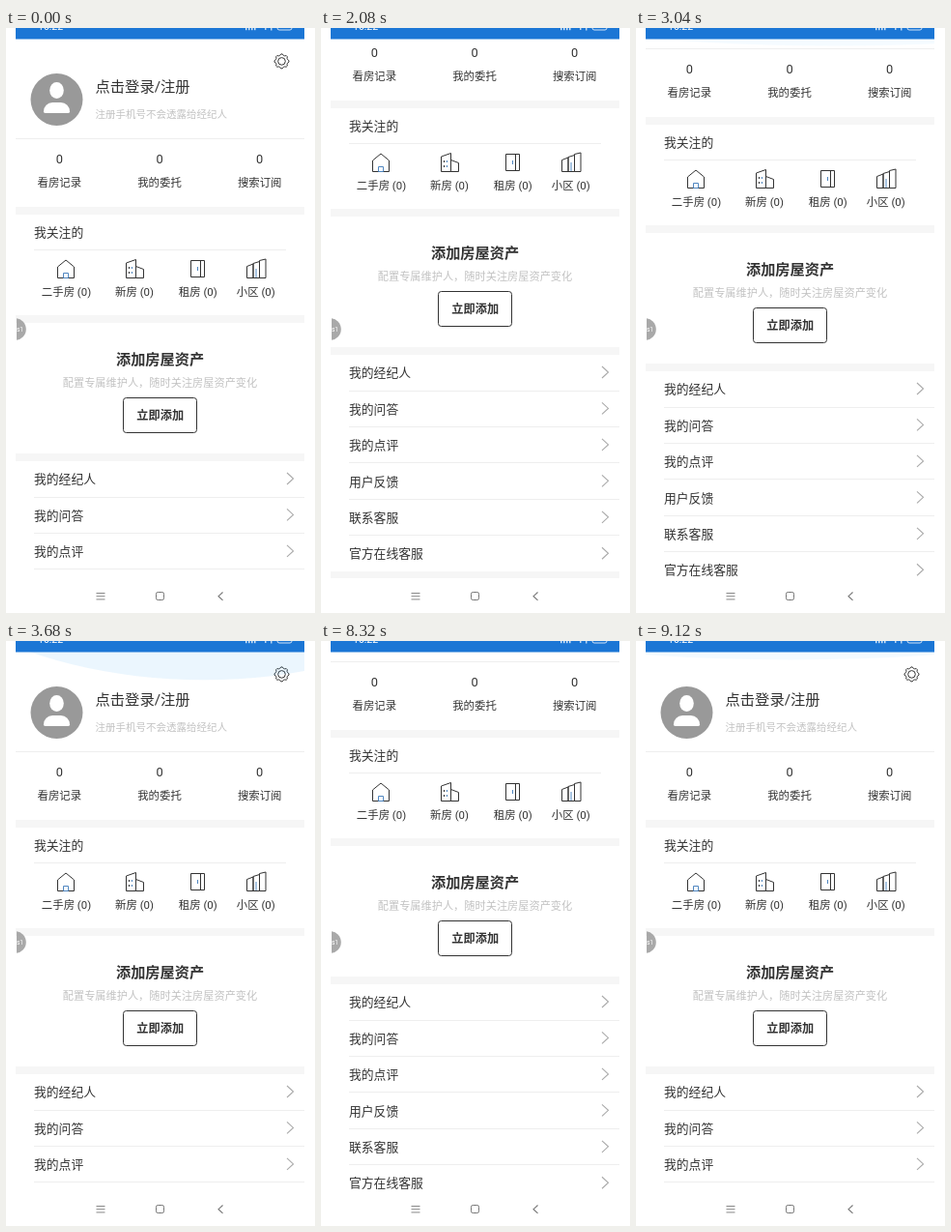
An HTML page with a canvas that plays this animation: 320x605 px, repeating every 9.28 s.

```html
<!DOCTYPE html>
<html lang="zh-CN">
<head>
<meta charset="utf-8">
<style>
html, body { margin: 0; width: 100%; height: 100%; overflow: hidden; background: #fff; }
canvas { display: block; width: 320px; height: 605px; }
</style>
</head>
<body>
<canvas id="stage"></canvas>
<script>
const W = 320, H = 605, LOOP = 9280, TICK = 160;
const LEFT = 10, RIGHT = 309, WIDE = RIGHT - LEFT, BAR = 11.5, NAV = 569;
const FONT = 'Roboto, "Noto Sans CJK SC", "Noto Sans CJK", sans-serif';
const INK = '#333', PALE = '#c2c2c2', LINE = '#eee', BAND = '#f6f6f6', BLUE = '#4f86c0';

const canvas = document.getElementById('stage');
const ctx = canvas.getContext('2d');
const dpr = window.devicePixelRatio || 1;
canvas.width = W * dpr;
canvas.height = H * dpr;

// Each trip flings to the end of the page and returns to the top,
// where the leftover pull shows as a fading glow.
const MAX_SCROLL = 110, FLING = 320, RETURN = 480, FADE = 800;
const trips = [
  { start: 320, end: 1440, pull: .4, x: 205 },
  { start: 1600, end: 2720, pull: .4, x: 205 },
  { start: 2880, end: 3680, pull: .6, x: 205 },
  { start: 8160, end: 8960, pull: .26, x: 160 }
];

const clamp = u => Math.min(1, Math.max(0, u));
const easeOut = u => 1 - (1 - u) ** 2.7;
const smooth = u => u * u * (3 - 2 * u);

function scrollAt(t) {
  const shares = trips.map(({ start, end }) =>
    easeOut(clamp((t - start) / FLING)) - smooth(clamp((t - end) / RETURN + 1)));
  return MAX_SCROLL * shares.reduce((sum, share) => sum + share, 0);
}

function box(x, y, w, h, color) {
  ctx.fillStyle = color;
  ctx.fillRect(x, y, w, h);
}

// Text is centred vertically on cy.
function text(str, x, cy, size, color = INK, align = 'left', weight = 400) {
  ctx.font = `${weight} ${size}px ${FONT}`;
  ctx.textAlign = align;
  ctx.fillStyle = color;
  ctx.fillText(str, x, cy + size * .37);
}

function path(points, color = INK, width = 1, close = false) {
  ctx.beginPath();
  for (let i = 0; i < points.length; i += 2) ctx.lineTo(points[i], points[i + 1]);
  if (close) ctx.closePath();
  ctx.strokeStyle = color;
  ctx.lineWidth = width;
  ctx.stroke();
}

function disc(x, y, r, color) {
  ctx.beginPath();
  ctx.arc(x, y, r, 0, 7);
  ctx.fillStyle = color;
  ctx.fill();
}

function outline(x, y, w, h, r, color = INK) {
  ctx.beginPath();
  ctx.roundRect(x, y, w, h, r);
  ctx.strokeStyle = color;
  ctx.lineWidth = 1;
  ctx.stroke();
}

function chevron(x, y, dx, dy, color) {
  path([x, y - dy, x + dx, y, x, y + dy], color, 1.1);
}

function gear(x, y) {
  const teeth = [];
  for (let i = 0; i < 32; i++) {
    const a = (i - .5) * Math.PI / 16;
    const r = i % 4 < 2 ? 7.5 : 6.3;
    teeth.push(x + r * Math.cos(a), y + r * Math.sin(a));
  }
  path(teeth, INK, 1, true);
  ctx.beginPath();
  ctx.arc(x, y, 3.8, 0, 7);
  ctx.stroke();
}

function avatar(x, y) {
  disc(x, y, 27, '#999');
  ctx.fillStyle = '#fff';
  ctx.beginPath();
  ctx.ellipse(x, y - 9.5, 7.3, 8.5, 0, 0, 7);
  ctx.fill();
  ctx.beginPath();
  ctx.roundRect(x - 13.5, y + 3, 27, 11, [10, 10, 2, 2]);
  ctx.fill();
}

// A building with a sloping roof, standing on the icon base line.
function tower(x, w, left, right) {
  const base = 258.5;
  path([x, base, x, left, x + w, right, x + w, base], INK, 1, true);
}

function icons() {
  path([53.5, 258.5, 53.5, 247, 62, 240, 70.5, 247, 70.5, 258.5], INK, 1, true);
  outline(59.5, 253.5, 5, 5, 0, BLUE);

  tower(124.5, 10, 243, 239.5);
  tower(134.5, 8, 246.5, 249.5);
  for (const y of [247, 252]) {
    box(127, y, 1, 2, INK);
    box(130, y, 1, 2, BLUE);
  }

  outline(191.5, 240.5, 14, 17, 0);
  path([201.5, 240.5, 201.5, 257.5]);
  path([198.5, 247, 198.5, 251], BLUE);

  for (let i = 0; i < 3; i++) tower(249.5 + 6.5 * i, 6.5, 246.5 - 3 * i, 244 - 2.5 * i);
  path([259, 258, 259, 249], BLUE);
}

function page() {
  gear(285.5, 34.4);
  avatar(52.5, 74);
  text('点击登录/注册', 92.5, 60, 15.3);
  text('注册手机号不会透露给经纪人', 92.5, 89.5, 10.5, PALE);
  box(LEFT, 114, WIDE, 1, LINE);

  ['看房记录', '我的委托', '搜索订阅'].forEach((label, i) => {
    const x = 55.3 + 103.7 * i;
    text('0', x, 135.7, 12.8, INK, 'center');
    text(label, x, 160, 11.4, INK, 'center');
  });

  for (const y of [185, 297, 440, 672]) box(LEFT, y, WIDE, 8, BAND);

  text('我关注的', 29, 211, 12.8);
  box(29, 229, 261, 1, LINE);
  icons();
  [['二手房', 62.5], ['新房', 133], ['租房', 198.8], ['小区', 258.8]].forEach(([label, x]) =>
    text(label + ' (0)', x, 272.5, 11.4, INK, 'center'));

  text('添加房屋资产', 159.5, 342.5, 15.2, INK, 'center', 700);
  text('配置专属维护人，随时关注房屋资产变化', 159.5, 366.5, 11.2, PALE, 'center');
  outline(121.5, 382.5, 76, 36, 3);
  text('立即添加', 159.7, 400.5, 12.2, INK, 'center', 700);

  ['我的经纪人', '我的问答', '我的点评', '用户反馈', '联系客服', '官方在线客服'].forEach((label, i) => {
    const y = 466.5 + i * 37.45;
    text(label, 29, y, 12.8);
    chevron(291, y - .5, 6.5, 6, '#aaa');
    if (i < 5) box(29, Math.floor(y + 18.5), RIGHT - 29, 1, LINE);
  });
}

function glow(t) {
  const r = WIDE * 1.2;
  for (const { end, pull, x } of trips) {
    if (t < end || t >= end + FADE) continue;
    const s = pull * (1 - (t - end) / FADE) ** 2;
    ctx.beginPath();
    ctx.ellipse(x, BAR - r * Math.cos(Math.PI / 6) * s, r, r * s, 0, 0, 7);
    ctx.fillStyle = `rgba(30,150,240,${Math.min(.085, s * .3)})`;
    ctx.fill();
  }
}

function statusBar(t) {
  box(LEFT, 0, WIDE, BAR, '#1b76d5');
  text('10:22', 33, -1.5, 10.5, '#fff');
  for (let i = 0; i < 4; i++) box(248 + i * 3, 0, 1.5, 2.2, '#d1e4f7');
  box(268, 0, 1.5, 2, '#b9d5f3');
  if (t < 4800 || t >= 5760) box(274, 0, 1.5, 2.5, '#b9d5f3');
  outline(281, -5, 15, 7, 2, '#cfe2f7');
}

function floatingTab() {
  ctx.save();
  ctx.beginPath();
  ctx.rect(LEFT + 1, 295, 20, 34);
  ctx.clip();
  disc(9.5, 311.5, 11.3, 'rgba(160,160,160,.9)');
  text('s1', 11, 312, 6.5, '#fff');
  ctx.restore();
}

function navBar() {
  box(LEFT, NAV, WIDE, H - NAV, '#fff');
  for (let i = 0; i < 3; i++) box(93.5, 584 + i * 3.2, 9, 1, '#888');
  outline(155.5, 583.5, 8, 8, 1.8, '#777');
  chevron(224.5, 587.7, -4.5, 4.2, '#777');
}

function draw(t) {
  ctx.setTransform(dpr, 0, 0, dpr, 0, 0);
  box(0, 0, W, H, '#fff');
  ctx.save();
  ctx.beginPath();
  ctx.rect(LEFT, BAR - 1, WIDE, NAV - BAR + 1);
  ctx.clip();
  ctx.save();
  ctx.translate(0, -Math.floor(scrollAt(t) + .01));
  page();
  ctx.restore();
  glow(t);
  ctx.restore();
  statusBar(t);
  floatingTab();
  navBar();
}

const began = performance.now();
function frame() {
  const t = (performance.now() - began) % LOOP;
  draw(Math.floor(t / TICK) * TICK);
  requestAnimationFrame(frame);
}
frame();
</script>
</body>
</html>
```
